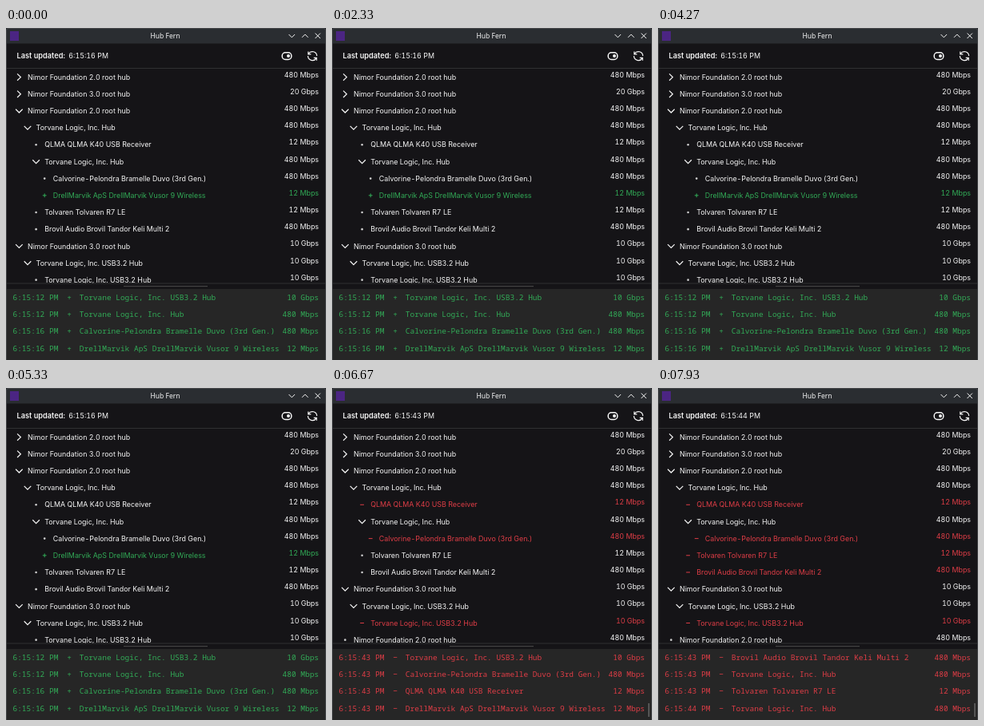
Animation, 400 px wide and 416 px high, one loop 8000 ms. Source, as an HTML page:

```html
<!DOCTYPE html>
<html lang="en">
<head>
<meta charset="utf-8">
<title>Hub Fern</title>
<style>
html, body { margin: 0; width: 100%; height: 100%; overflow: hidden; background: #151417; }
svg { display: block; width: 100vw; height: 100vh; }
text { font: 8.9px Inter, sans-serif; font-feature-settings: "tnum"; fill: #f6f6f6; white-space: pre; }
.title { font: 8.5px "Noto Sans", sans-serif; }
.bold { font-size: 9.2px; font-weight: 600; }
.log text { font: 500 9.47px "Noto Sans Mono", monospace; }
.end { text-anchor: end; }
.mid { text-anchor: middle; }
.line { fill: none; stroke: #f6f6f6; stroke-width: 1.2; }
</style>
</head>
<body>
<svg viewBox="0 0 400 416" preserveAspectRatio="none">
  <defs><clipPath id="view"><rect y="50" width="400" height="270"/></clipPath></defs>
  <rect width="400" height="416" fill="#151417"/>
  <rect width="400" height="19.5" fill="#2a2d31"/>
  <rect x="5" y="4" width="11" height="12" fill="#4b2583"/>
  <text class="title mid" x="199" y="13">Hub Fern</text>
  <path class="line" style="stroke-width:1" d="M353.5 8l3.8 3.8 3.8-3.8M370 11.8l3.8-3.8 3.8 3.8M386.5 6.6l6.4 6.4m0-6.4l-6.4 6.4"/>
  <text class="bold" x="13.5" y="38.2">Last updated:</text>
  <text id="clock" x="78.3" y="38.2"></text>
  <rect class="line" x="345.2" y="30.8" width="11.6" height="8.6" rx="4" style="stroke-width:1.5"/>
  <circle cx="353" cy="35.1" r="2" fill="#f6f6f6"/>
  <path class="line" d="M388.6 35.1A5.6 5.6 0 0 0 378.2 32.3M377.8 29.5v3.3h3.5M377.4 35.1A5.6 5.6 0 0 0 387.8 37.9M388.2 40.7v-3.3h-3.5"/>
  <rect y="50" width="400" height="1" fill="#303032"/>
  <g id="tree" clip-path="url(#view)"></g>
  <rect y="319.5" width="400" height="1" fill="#303032"/>
  <rect y="327" width="400" height="89" fill="#262626"/>
  <rect x="147" y="323" width="105" height="1.2" fill="#444"/>
  <g id="log" class="log"></g>
  <rect id="thumb" x="395" y="395" width="2" height="17" fill="#555"/>
  <path d="M.5 416V3q0-2.5 2.5-2.5h394q2.5 0 2.5 2.5v413" fill="none" stroke="#45474a"/>
</svg>
<script>
const LOOP = 8000, FIRST = 6270, STEP = 123, PITCH = 21.17;
const GREEN = '#32ab57', RED = '#de3d46', WHITE = '#f6f6f6';
const slow = '12 Mbps', high = '480 Mbps', fast = '10 Gbps';
const hub = 'Torvane Logic, Inc. Hub', hub3 = 'Torvane Logic, Inc. USB3.2 Hub';
const root2 = 'Nimor Foundation 2.0 root hub', root3 = 'Nimor Foundation 3.0 root hub';
const audio = 'Calvorine-Pelondra Bramelle Duvo (3rd Gen.)';
const mouse = 'DrellMarvik ApS DrellMarvik Vusor 9 Wireless';
const radio = 'QLMA QLMA K40 USB Receiver';
const keys = 'Tolvaren Tolvaren R7 LE';
const dac = 'Brovil Audio Brovil Tandor Keli Multi 2';

// depth, icon, name, speed, index of the removal event
const tree = [
  [0, '>', root2, high], [0, '>', root3, '20 Gbps'], [0, 'v', root2, high],
  [1, 'v', hub, high], [2, '.', radio, slow, 2], [2, 'v', hub, high],
  [3, '.', audio, high, 1], [3, '+', mouse, slow, 3],
  [2, '.', keys, slow, 6], [2, '.', dac, high, 4],
  [0, 'v', root3, fast], [1, 'v', hub3, fast], [2, '.', hub3, fast, 0],
  [0, '.', root2, high]
];
const added = [['12', hub3, fast], ['12', hub, high], ['16', audio, high], ['16', mouse, slow]]
  .map(([s, ...rest]) => [s, '+', ...rest]);
const removed = [[hub3, fast], [audio, high], [radio, slow], [mouse, slow],
  [dac, high], [hub, high], [keys, slow], [hub, high]]
  .map((item, i) => [i < 7 ? '43' : '44', '−', ...item]);

const el = id => document.getElementById(id);
const stamp = s => `6:15:${s} PM`;
const label = (x, y, s, color, cls = '') =>
  `<text x="${x}" y="${y}" style="fill:${color}" class="${cls}">${s}</text>`;

function icon(kind, x, y, color) {
  if (kind === '.') return `<circle cx="${x}" cy="${y}" r="1.3" fill="#d0d0d0"/>`;
  const d = {
    '>': 'm-2.3 -4.2l4.3 4.2l-4.3 4.2', 'v': 'm-4.3 -2.2l4.3 4.3l4.3 -4.3',
    '+': 'm-2.4 0h4.8m-2.4 -2.4v4.8', '-': 'm-2.4 0h4.8'
  }[kind];
  const width = kind === '+' || kind === '-' ? 1 : 1.2;
  return `<path d="M${x} ${y}${d}" fill="none" stroke="${color}" stroke-width="${width}"/>`;
}

function drawTree(count) {
  return tree.filter(row => row[2] !== mouse || count <= row[4]).map((row, i) => {
    const [depth, kind, name, speed, event] = row;
    const gone = event < count;
    const color = gone ? RED : kind === '+' ? GREEN : WHITE;
    const x = 27 + depth * 10.6, y = 61.6 + i * PITCH;
    return icon(gone ? '-' : kind, x - 10.6, y, color) +
      label(x, y + 3.2, name, color) + label(391, y + .1, speed, color, 'end');
  }).join('');
}

function drawLog(count) {
  return added.concat(removed.slice(0, count)).slice(-4).map(([s, sign, name, speed], i) => {
    const color = sign === '+' ? GREEN : RED, y = 341 + i * PITCH;
    return label(8.5, y, stamp(s), color) + label(79, y, sign, color, 'mid') +
      label(91.8, y, name, color) + label(391, y, speed, color, 'end');
  }).join('');
}

let shown = -1;
function render(t) {
  const count = Math.max(0, Math.min(removed.length, Math.floor((t - FIRST) / STEP) + 1));
  if (count === shown) return;
  shown = count;
  el('clock').textContent = stamp(count ? removed[count - 1][0] : '16');
  el('tree').innerHTML = drawTree(count);
  el('log').innerHTML = drawLog(count);
  el('thumb').style.display = count ? '' : 'none';
}

const start = performance.now();
function tick(now) {
  render(Math.max(0, now - start) % LOOP);
  requestAnimationFrame(tick);
}
render(0);
requestAnimationFrame(tick);
</script>
</body>
</html>
```
